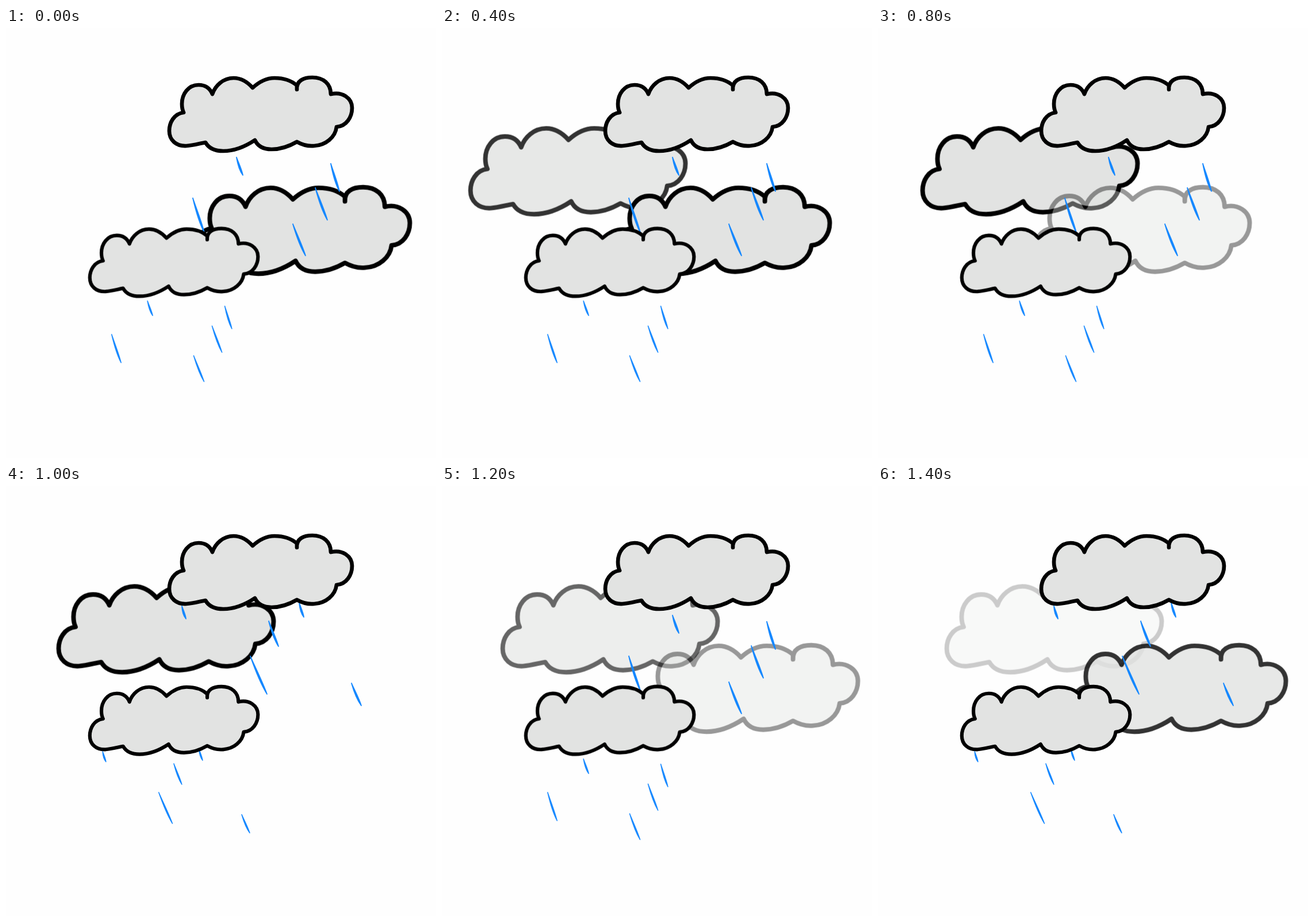
An HTML page that plays this animation: 748x748 px, repeating every 1500 ms.

```html
<!DOCTYPE html>
<html lang="en">
<head>
<meta charset="utf-8">
<title>Rain clouds</title>
<style>
  html, body { margin: 0; width: 100%; height: 100%; overflow: hidden; background: #fefefe; }
  svg { display: block; width: 100vw; height: 100vh; }

  .drift, .fade, .rain {
    animation-duration: 1500ms;
    animation-iteration-count: infinite;
    animation-delay: calc(var(--d, 0ms) - 1ms);
  }
  .drift { animation-name: drift; animation-timing-function: steps(15); }
  .fade { animation-name: fade; animation-timing-function: steps(5); }
  .back { --d: -500ms; }
  .back .drift { animation-direction: reverse; animation-name: drift-back; animation-direction: normal; }

  @keyframes drift { from { transform: translateX(0); } to { transform: translateX(105px); } }
  @keyframes drift-back { from { transform: translateX(0); } to { transform: translateX(-105px); } }
  @keyframes fade { 0%, 100% { opacity: 0; } 33.333%, 66.666% { opacity: 1; } }

  /* four rain poses take turns, 100 ms each; the loop ends on the third */
  .rain { fill: #1688ff; stroke: #1688ff; stroke-width: 1.8; stroke-linejoin: round;
          animation-name: pose; animation-timing-function: step-end; }
  .p1 { --d: -1400ms; }
  .p2 { --d: -1300ms; }
  .p3 { animation-name: last-pose; }
  @keyframes pose {
    0%, 26.666%, 53.333%, 80% { visibility: visible; }
    6.666%, 33.333%, 60%, 86.666%, 100% { visibility: hidden; }
  }
  @keyframes last-pose {
    20%, 46.666%, 73.333% { visibility: visible; }
    0%, 26.666%, 53.333%, 80%, 100% { visibility: hidden; }
  }
</style>
</head>
<body>
<svg viewBox="0 0 748 748">
  <defs>
    <path id="cloud" fill="#e2e3e2" stroke="#000" stroke-width="6.7" stroke-linejoin="round" d="
      M309 147 C292 149 284 165 284 179 C284 195 296 206 314 205 C326 204 336 201 347 199
      C352 208 362 214 378 214 C400 214 418 205 433 195
      C438 206 448 211 462 211 C480 211 494 205 506 198
      C515 203 526 206 536 205 C556 204 573 190 575 172
      C592 171 602 155 602 139 C602 122 585 110 565 115
      C565 97 552 86 533 86 C517 86 505 92 506 107
      L506 100 C497 92 483 87 467 87 C452 87 440 94 429 104
      C421 95 410 87 396 87 C378 87 364 100 359 115
      C354 103 345 99 335 99 C317 99 306 115 306 132 C306 138 307 143 309 147 Z"/>
    <g id="rain"></g>
  </defs>

  <g class="fade"><g class="drift">
    <use href="#cloud" transform="translate(-312.5 72.2) scale(1.176)"/>
  </g></g>
  <g class="back"><g class="fade"><g class="drift">
    <use href="#cloud" transform="translate(29.5 175.7) scale(1.176)"/>
  </g></g></g>

  <g id="high"></g>
  <g id="low" transform="translate(-82.8 290.3) scale(.82)"></g>

  <use href="#cloud"/>
  <use href="#cloud" transform="translate(-115.5 269.7) scale(.92)"/>
</svg>
<script>
  // each drop: top x, top y, tip x, tip y
  const poses = [
    [[401, 225, 412, 256], [565, 236, 580, 284], [325, 296, 345, 356], [538, 278, 559, 334], [499, 341, 521, 396]],
    [[412, 258, 431, 308], [582, 283, 600, 338], [338, 340, 356, 386], [553, 321, 573, 368], [513, 380, 527, 413]],
    [[306, 209, 313, 231], [510, 203, 518, 228], [457, 235, 474, 279], [425, 296, 454, 362], [601, 343, 618, 382]],
    [[314, 247, 328, 292], [523, 238, 538, 280], [476, 283, 497, 342], [443, 344, 463, 396], [612, 378, 620, 400]]
  ];

  // thin at the top, widest near the tip
  const drop = ([x, y, X, Y]) => {
    const dx = X - x, dy = Y - y;
    const at = (k, side) => `${x + dx * k - 1 + side} ${y + dy * k}`;
    return `M${x} ${y}C${at(.35, 1.2)} ${at(.7, 2.6)} ${X} ${Y}C${at(.75, -2)} ${at(.4, -1.4)} ${x} ${y}Z`;
  };

  const rain = poses.map((drops, i) =>
    `<path class="rain p${i}" d="${drops.map(drop).join("")}"/>`).join("");
  for (const id of ["high", "low"]) document.getElementById(id).innerHTML = rain;
</script>
</body>
</html>
```
